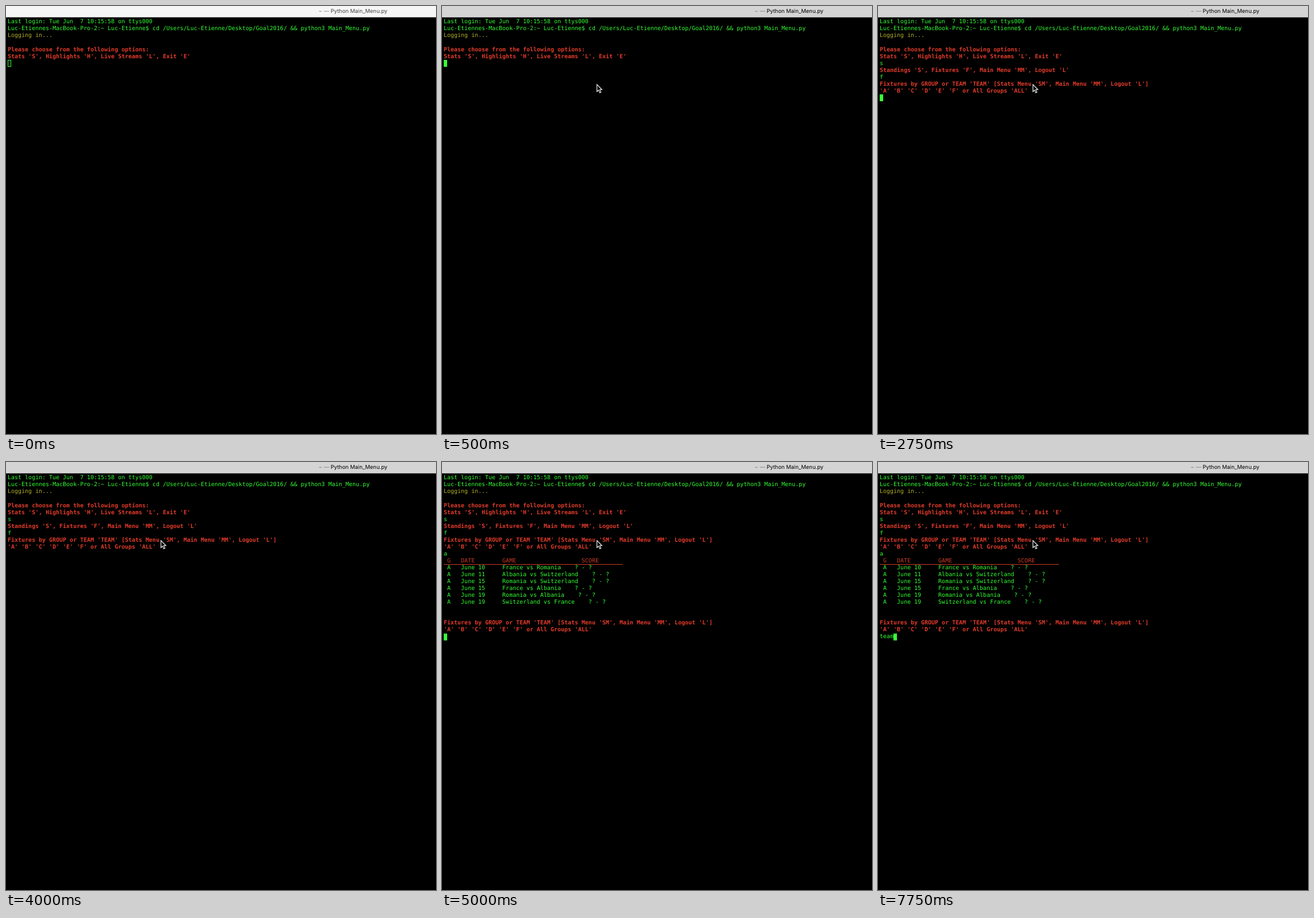
Recreate the animation shown at these times as an HTML page. Size 751 px wide and 746 px high, loop 8000 ms.

```html
<!DOCTYPE html>
<html lang="en">
<head>
<meta charset="utf-8">
<title>Terminal</title>
<style>
  html, body { margin: 0; width: 100%; height: 100%; overflow: hidden; background: #000; }
  body {
    position: relative;
    font: 10px/12px "DejaVu Sans Mono", "Liberation Mono", monospace;
    text-rendering: geometricPrecision;
  }
  #bar {
    position: absolute; inset: 0 0 auto; height: 19px; border-bottom: 1px solid #a8a8a8;
    font: 9.45px/19px Inter, Roboto, sans-serif; white-space: pre;
    background: #f6f6f6; color: #444;
  }
  #bar.active { background: #d4d4d4; color: #000; }
  #bar span { position: absolute; left: 567px; }
  #bar .dir { left: 546px; color: #777; }
  .row { position: absolute; left: 3px; white-space: pre; color: #33ff33; }
  .yellow { color: #b0b02c; }
  .red { color: #e23b2a; font-weight: bold; }
  .head { color: #cc3a27; box-shadow: inset 0 -1px #cc3a27; }
  #caret { position: absolute; width: 6px; height: 12px; box-sizing: border-box; border: 1px solid #38ff38; }
  #caret.solid { background: #38ff38; }
  #mouse { position: absolute; left: 0; top: 0; overflow: visible; }
</style>
</head>
<body>
<div id="bar"><span class="dir">~ —</span><span>Python Main_Menu.py</span></div>
<div id="caret"></div>
<svg id="mouse" width="11" height="17">
  <path d="M.6 .9V13.2L3.4 10.6 5.5 15.4 7.6 14.5 5.5 9.8H9.3Z" fill="#000" stroke="#fff" stroke-width="1.1"/>
</svg>
<script>
const LOOP = 8000;
const $ = id => document.getElementById(id);
const bar = $('bar'), caret = $('caret'), mouse = $('mouse');
const rowTop = (row, offset = 0) => Math.round(22 + offset + row * 12.04) + 'px';

const user = 'Luc-Etienne';
const ask = "Fixtures by GROUP or TEAM 'TEAM' [Stats Menu 'SM', Main Menu 'MM', Logout 'L']";
const groups = "'A' 'B' 'C' 'D' 'E' 'F' or All Groups 'ALL'";
const games = [
  [10, 'France vs Romania'], [11, 'Albania vs Switzerland'],
  [15, 'Romania vs Switzerland'], [15, 'France vs Albania'],
  [19, 'Romania vs Albania'], [19, 'Switzerland vs France']
];

// start time, row, text, style
const lines = [
  [0, 0, 'Last login: Tue Jun  7 10:15:58 on ttys000'],
  [0, 1, `${user}s-MacBook-Pro-2:~ ${user}$ cd /Users/${user}/Desktop/Goal2016/ && python3 Main_Menu.py`],
  [0, 2, 'Logging in...', 'yellow'],
  [0, 4, 'Please choose from the following options:', 'red'],
  [0, 5, "Stats 'S', Highlights 'H', Live Streams 'L', Exit 'E'", 'red'],
  [1250, 6, 's'],
  [1500, 7, "Standings 'S', Fixtures 'F', Main Menu 'MM', Logout 'L'", 'red'],
  [2500, 8, 'f'],
  [2750, 9, ask, 'red'],
  [2750, 10, groups, 'red'],
  [4750, 11, 'a'],
  [5000, 12, ' G   DATE'.padEnd(17) + 'GAME'.padEnd(23) + 'SCORE'.padEnd(12), 'head'],
  ...games.map(([day, game], i) => [5000, 13 + i, ` A   June ${day}     ${game}    ? - ?`]),
  [5000, 21, ask, 'red'],
  [5000, 22, groups, 'red'],
  [7500, 23, 'tea'],
  [7750, 23, '   m']
];

// start time, row, column, shown
const carets = [
  [0, 6, 0, 1], [1250, 6, 1, 1], [1500, 8, 0, 1], [2000, 8, 0, 0],
  [2500, 8, 1, 1], [2750, 11, 0, 1], [4000, 11, 0, 0], [4500, 11, 0, 1],
  [4750, 11, 1, 1], [5000, 23, 0, 1], [6000, 23, 0, 0], [6500, 23, 0, 1],
  [7000, 23, 0, 0], [7500, 23, 3, 1], [7750, 23, 4, 1]
];

const rows = lines.map(([at, row, text, style = '']) => {
  const el = document.createElement('div');
  el.className = `row ${style}`;
  el.textContent = text;
  el.style.top = rowTop(row, 0.4);
  document.body.insertBefore(el, caret);
  return { at, el };
});

const show = (el, on) => { el.style.visibility = on ? 'visible' : 'hidden'; };

function draw() {
  const t = performance.now() % LOOP;
  const focused = t >= 500;
  for (const { at, el } of rows) show(el, t >= at);

  const [, row, col, lit] = carets.findLast(([at]) => t >= at);
  show(caret, lit);
  caret.style.left = 3 + col * 6.02 + 'px';
  caret.style.top = rowTop(row);
  caret.className = focused ? 'solid' : '';

  bar.className = focused ? 'active' : '';
  show(mouse, t >= 250);
  mouse.style.transform = focused ? 'translate(270px, 136px)' : 'translate(427px, 97px)';
  requestAnimationFrame(draw);
}
draw();
</script>
</body>
</html>
```
